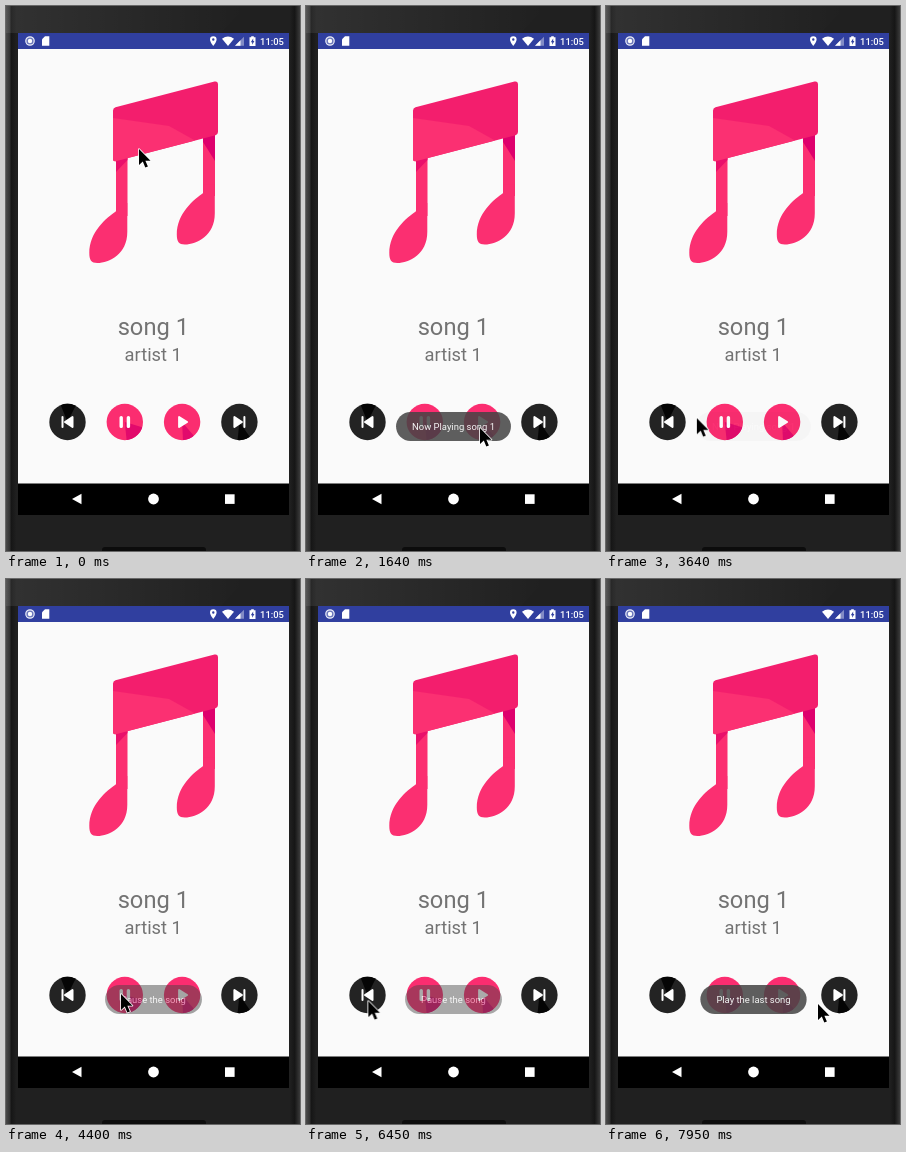
Recreate the animation shown at these times as an HTML page. Size 294x545 px, loop 8 s.

```html
<!DOCTYPE html>
<html lang="en">
<head>
<meta charset="utf-8">
<title>Music player</title>
<style>
  html, body { margin: 0; width: 100%; height: 100%; overflow: hidden; background: #1e1e1e; }
  svg { display: block; width: 294px; height: 545px; font-family: Roboto, "Liberation Sans", sans-serif; }
  text { text-anchor: middle; }
  .toast { opacity: 0; }
  .toast rect { fill: rgba(68, 68, 68, .86); }
  .toast text { fill: #f4f4f4; font-size: 9.45px; }
  .label { fill: #737373; }
  .icon { fill: #fff; stroke: #fff; stroke-width: 2; stroke-linejoin: round; stroke-linecap: round; }
</style>
</head>
<body>
<svg viewBox="0 0 294 545">
  <defs>
    <linearGradient id="shell">
      <stop offset="0" stop-color="#4a4a4a"/>
      <stop offset=".012" stop-color="#343434"/>
      <stop offset=".018" stop-color="#161616"/>
      <stop offset=".035" stop-color="#202020"/>
      <stop offset=".965" stop-color="#202020"/>
      <stop offset=".982" stop-color="#161616"/>
      <stop offset="1" stop-color="#3a3a3a"/>
    </linearGradient>
    <linearGradient id="glare">
      <stop offset="0" stop-color="#fff" stop-opacity=".08"/>
      <stop offset="1" stop-color="#fff" stop-opacity="0"/>
    </linearGradient>
    <clipPath id="disc"><circle r="18.2"/></clipPath>
    <path id="head" d="M0 0C-10 7-27 21-27 42C-27 49-25 52-19 52C-7 52 11 43 11 21V-8H0Z"/>
  </defs>

  <!-- phone -->
  <rect width="294" height="545" fill="url(#shell)"/>
  <path d="M0 0H240L215 27H0Z" fill="url(#glare)"/>
  <rect x="96" y="541" width="104" height="6" rx="3" fill="#0c0c0c"/>
  <rect x="12" y="27" width="271" height="482" fill="#fafafa"/>
  <rect x="12" y="27" width="271" height="16" fill="#303f9f"/>
  <rect x="12" y="477.5" width="271" height="31.5"/>

  <!-- status bar -->
  <g fill="#fff">
    <circle cx="24" cy="35" r="4.2" fill="#6a76bb" stroke="#eceef8" stroke-width="1.2"/>
    <circle cx="24" cy="35" r="2.2"/>
    <path d="M39 30.3H43.3V39.7H36V33.2Z"/>
    <path id="pin" fill-rule="evenodd" d="M207.3 30.2A3.3 3.3 0 0 0 204 33.5C204 36 207.3 40 207.3 40S210.6 36 210.6 33.5A3.3 3.3 0 0 0 207.3 30.2ZM207.3 32.3A1.2 1.2 0 1 1 207.3 34.7A1.2 1.2 0 1 1 207.3 32.3Z"/>
    <path d="M216 32.7Q222 28.3 228 32.7L222 40Z"/>
    <path d="M229 39.8L238 30.8V39.8Z" opacity=".4"/>
    <path d="M229 39.8L234.5 34.3V39.8Z"/>
    <path d="M243.5 31.2H245.2V30.2H247.8V31.2H249.5V40H243.5Z"/>
    <path d="M247.2 32.5L244.8 36.2H246.2V38.7L248.4 35H247.2Z" fill="#303f9f"/>
    <text x="266" y="38.6" font-size="9.4" font-weight="500">11:05</text>
  </g>

  <!-- artwork -->
  <g fill="#fb2f71">
    <path d="M110 148H121.5V210H110ZM197 124H209V190H197Z"/>
    <path d="M110 150H121.5V154L110 166Z" fill="#e9106b"/>
    <path d="M197 126H209V155L197 136Z" fill="#de006d"/>
    <use href="#head" x="110.3" y="205"/>
    <use href="#head" x="197.8" y="186.5"/>
    <path d="M109.5 101.3L208.5 75.6Q212 75 212 78.5V126Q212 128.5 209.5 129.2L109.5 155.2Q107 155.6 107 153V104.5Q107 102 109.5 101.3Z" fill="#f31e6d"/>
    <path d="M107 112L163 120L189 134.5L109.5 155.2Q107 155.6 107 153Z" fill="#fb3072"/>
  </g>

  <text class="label" x="147.3" y="328.6" font-size="23.7">song 1</text>
  <text class="label" x="147.2" y="355.2" font-size="18.3">artist 1</text>

  <g id="controls"></g>

  <!-- navigation bar -->
  <g fill="#fff">
    <path d="M66 493L75.5 487.8V498.2Z"/>
    <circle cx="147.5" cy="493" r="5.4"/>
    <rect x="219" y="488.3" width="9.6" height="9.6"/>
  </g>

  <g id="toasts"></g>

  <path id="cursor" d="M0 0V16L3.8 12.6L6.3 18.5L8.9 17.4L6.4 11.7H11.5Z" stroke="#fff" stroke-width="1.6" stroke-linejoin="round" paint-order="stroke"/>
</svg>

<script>
  const LOOP = 8000;
  const FADE = 340;
  const HOLD = 2080;
  const $ = id => document.getElementById(id);

  const play = (el, frames) =>
    el.animate(frames, { duration: LOOP, iterations: Infinity });

  function svg(tag, attrs, parent) {
    const el = document.createElementNS("http://www.w3.org/2000/svg", tag);
    for (const key in attrs) el.setAttribute(key, attrs[key]);
    return parent.appendChild(el);
  }

  // round buttons, each with one darker wedge
  const dark = ["#232323", "#050505"];
  const pink = ["#fb2d70", "#e20a6c"];
  const skip = "M-5 -5V5M5 -5V5L-2.5 0Z";
  const buttons = [
    { colors: dark, icon: skip, wedge: "M0 0L-8 -20H10Z" },
    { colors: pink, icon: "M-3.6 -4.4V4.4M3.6 -4.4V4.4", wedge: "M0 0L2 20H20V6Z", weight: 3.4 },
    { colors: pink, icon: "M-3 -5V5L5 0Z", wedge: "M0 0L1 20H17Z" },
    { colors: dark, icon: skip, wedge: "M0 0L-2 20H14Z", flip: true }
  ];

  buttons.forEach(({ colors, icon, wedge, weight = 2, flip }, i) => {
    const group = svg("g", { transform: `translate(${61.5 + 57.3 * i} 416)` }, $("controls"));
    svg("circle", { r: 18.2, fill: colors[0] }, group);
    svg("path", { d: wedge, fill: colors[1], "clip-path": "url(#disc)" }, group);
    const mark = svg("path", { class: "icon", d: icon }, group);
    mark.style.strokeWidth = weight;
    if (flip) mark.setAttribute("transform", "scale(-1 1)");
  });

  function toast(label, start) {
    const group = svg("g", { class: "toast" }, $("toasts"));
    const pill = svg("rect", { y: 406, height: 29, rx: 14.5 }, group);
    const text = svg("text", { x: 147.5, y: 424.4 }, group);
    text.textContent = label;
    const width = text.getComputedTextLength() + 32;
    pill.setAttribute("x", 147.5 - width / 2);
    pill.setAttribute("width", width);

    const key = (t, opacity) => ({ offset: Math.min(t / LOOP, 1), opacity });
    const end = start + HOLD;
    play(group, [key(0, 0), key(start, 0), key(start + FADE, 1),
                 key(end, 1), key(end + FADE, 0), key(LOOP, 0)]);
  }

  toast("Now Playing song 1", 1230);
  toast("Pause the song", 4210);
  toast("Play the last song", 7020);

  // pointer trips between resting spots, some by way of a turning point
  const trips = [
    { from: 60, until: 820, via: [118, 250], to: [174, 422] },
    { from: 2420, until: 3170, via: [128, 426], to: [166, 427] },
    { from: 3290, until: 4050, via: [90, 412], to: [115, 415] },
    { from: 4460, until: 5640, via: [118, 427], to: [165, 423] },
    { from: 5810, until: 6570, to: [57, 422] },
    { from: 7090, until: 7950, to: [212, 425] }
  ];

  const stop = (t, [x, y]) => ({
    offset: t / LOOP,
    transform: `translate(${x}px, ${y}px)`,
    easing: "ease-in-out"
  });

  let spot = [133, 143];
  const stops = [stop(0, spot)];
  for (const { from, until, via, to } of trips) {
    stops.push(stop(from, spot));
    if (via) stops.push(stop((from + until) / 2, via));
    stops.push(stop(until, to));
    spot = to;
  }
  play($("cursor"), [...stops, stop(LOOP, spot)]);

  play($("pin"), [
    { offset: 0, opacity: 1, easing: "step-end" },
    { offset: 7500 / LOOP, opacity: 0 },
    { offset: 1, opacity: 0 }
  ]);
</script>
</body>
</html>
```
